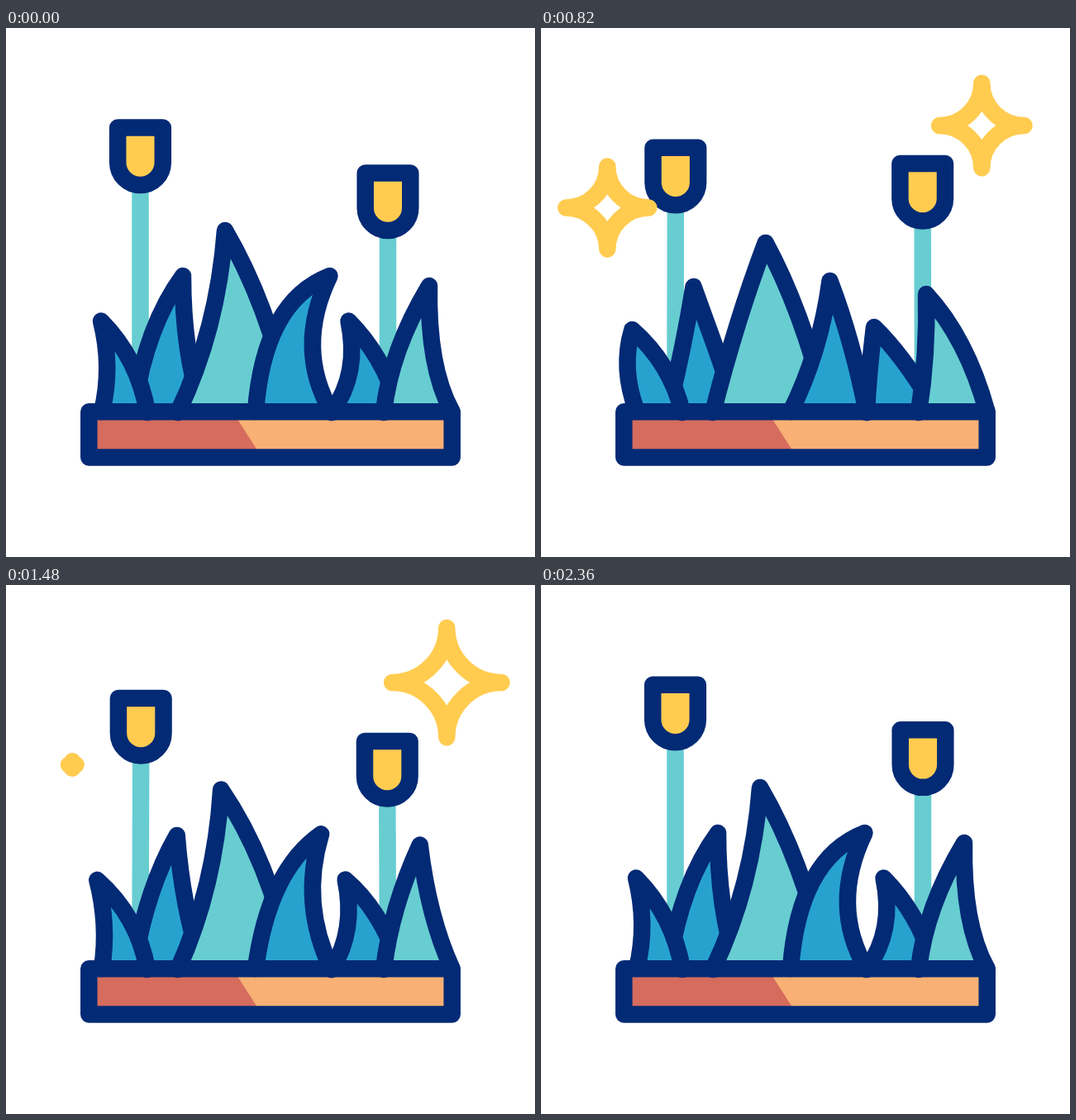
An HTML page with a canvas for the animation above (2400 ms loop, 640x640 px).

```html
<!DOCTYPE html>
<html lang="en">
<head>
<meta charset="utf-8">
<title>Garden bed</title>
<style>
html, body { margin: 0; height: 100%; overflow: hidden; background: #fff; }
canvas { display: block; width: 100vw; height: 100vh; }
</style>
</head>
<body>
<canvas width="640" height="640"></canvas>
<script>
const ctx = document.querySelector('canvas').getContext('2d');
const LOOP = 2400;
const NAVY = '#032a75', TEAL = '#67cdd1', BLUE = '#27a2cf', YELLOW = '#ffcc50';

// Sine-eased value from a list of [time, value] keys
function track(t, keys) {
  if (t <= keys[0][0]) return keys[0][1];
  for (let i = 1; i < keys.length; i++) {
    const [t0, v0] = keys[i - 1], [t1, v1] = keys[i];
    if (t <= t1) return v0 + (v1 - v0) * (1 - Math.cos(Math.PI * (t - t0) / (t1 - t0))) / 2;
  }
  return keys[keys.length - 1][1];
}

// Each pose: left control, tip, right control; flex is an extra offset
const blades = [
  { fill: BLUE, left: [155, 458], right: [236, 458],
    rest: [170, 360, 214, 300, 214, 390], bent: [173, 385, 182.5, 313, 211, 385], flex: [0, 0, 2, 0, 0, 0] },
  { fill: BLUE, left: [116, 464], right: [171, 465],
    rest: [129, 410, 115, 354.5, 160, 400], bent: [108, 412, 94.5, 365, 157, 402], flex: [-12, 0, 16, 0, 0, 4] },
  { fill: TEAL, left: [208, 465], right: [345, 458],
    rest: [256, 365, 265, 245, 316, 332], bent: [243, 365, 244, 256, 326, 335], flex: [-7, -11, 28, 4, -11, 5] },
  { fill: BLUE, left: [302, 464], right: [394, 465],
    rest: [312, 331, 391.5, 300, 349, 388], bent: [338, 392, 346.5, 306, 377, 378], flex: [0, 0, 3, 0, 0, 0] },
  { fill: BLUE, left: [394, 465], right: [475, 458],
    rest: [428, 418, 414.5, 354.5, 455, 395], bent: [409, 418, 397.5, 363, 445, 383], flex: [-13, 0, 5.5, -1, -8, 12] },
  { fill: TEAL, left: [457, 465], right: [539.5, 464],
    rest: [465, 390, 512, 312, 510, 410], bent: [468, 395, 463, 323, 515, 375], flex: [0, 0, 3, -1, 0, 0] }
];
const bendKeys = [[0, 0], [320, 1], [800, 1], [1800, 0]];
const flexKeys = [[320, 0], [860, 1], [1480, 0]];

const lamps = [
  { x: 162.5, sway: 1.2, keys: [[0, 120.5], [600, 150.8], [1240, 128], [1800, 150.8], [LOOP, 120.5]] },
  { x: 462, sway: -1.2, keys: [[0, 175.5], [600, 149], [1240, 205.5], [1800, 163.3], [LOOP, 175.5]] }
];
const swayKeys = [[600, 0], [1240, 1], [1800, 0]];

const stars = [{ x: 80.3, y: 217.5, delay: 0 }, { x: 533.3, y: 118, delay: 260 }];
const starKeys = [[128, 0], [424, 67], [590, 50], [1010, 50], [1255, 67], [1525, 0]];

function stroke(color) {
  ctx.strokeStyle = color;
  ctx.stroke();
}

function fill(color) {
  ctx.fillStyle = color;
  ctx.fill();
}

function drawLamp({ x, sway, keys }, t) {
  const top = track(t, keys), cx = x + sway * track(t, swayKeys), r = 27.3;
  ctx.beginPath();
  ctx.moveTo(x, 450);
  ctx.lineTo(cx, top + 60);
  stroke(TEAL);
  ctx.beginPath();
  ctx.moveTo(cx - r, top);
  ctx.lineTo(cx + r, top);
  ctx.arc(cx, top + 42.2, r, 0, Math.PI);
  ctx.closePath();
  fill(YELLOW);
  stroke(NAVY);
}

function drawBlade(blade, bend, flex) {
  const c = blade.rest.map((v, i) => v + (blade.bent[i] - v) * bend + blade.flex[i] * flex);
  ctx.beginPath();
  ctx.moveTo(...blade.left);
  ctx.quadraticCurveTo(c[0], c[1], c[2], c[3]);
  ctx.quadraticCurveTo(c[4], c[5], ...blade.right);
  fill(blade.fill);
  stroke(NAVY);
}

function drawStar({ x, y, delay }, t) {
  const r = track(t - delay, starKeys);
  if (r < 0.5) return;
  ctx.beginPath();
  ctx.moveTo(x, y - r);
  ctx.arcTo(x, y, x + r, y, r);
  ctx.arcTo(x, y, x, y + r, r);
  ctx.arcTo(x, y, x - r, y, r);
  ctx.arcTo(x, y, x, y - r, r);
  ctx.closePath();
  stroke(YELLOW);
}

function drawSoil() {
  ctx.fillStyle = '#f8b074';
  ctx.fillRect(100, 464, 440, 56);
  ctx.beginPath();
  ctx.moveTo(100, 464);
  ctx.lineTo(274, 464);
  ctx.lineTo(310, 520);
  ctx.lineTo(100, 520);
  fill('#d56c5e');
}

function draw() {
  const t = performance.now() % LOOP;
  ctx.clearRect(0, 0, 640, 640);
  ctx.lineWidth = 20.5;
  ctx.lineCap = ctx.lineJoin = 'round';
  drawSoil();
  lamps.forEach(lamp => drawLamp(lamp, t));
  const bend = track(t, bendKeys), flex = track(t, flexKeys);
  blades.forEach(blade => drawBlade(blade, bend, flex));
  ctx.strokeStyle = NAVY;
  ctx.strokeRect(100.3, 464.3, 439.4, 55.3);
  stars.forEach(star => drawStar(star, t));
  requestAnimationFrame(draw);
}
draw();
</script>
</body>
</html>
```
